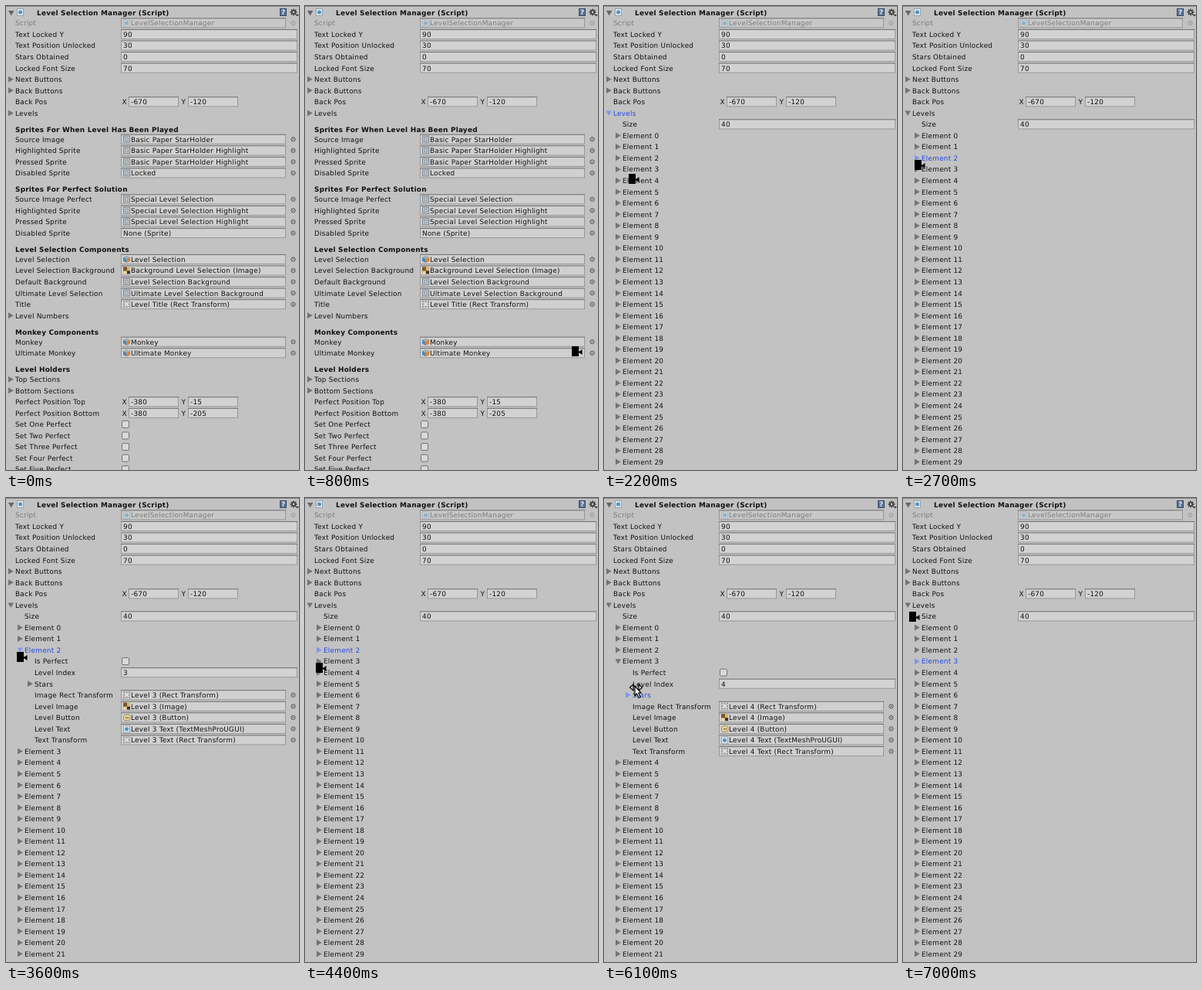
An HTML page with a canvas for the animation above (7.1 s loop, 380 px wide and 600 px high).

```html
<!DOCTYPE html>
<html>
<head>
<meta charset="utf-8">
<style>
html, body { margin: 0; width: 100%; height: 100%; overflow: hidden; background: #c2c2c2; }
canvas { display: block; }
</style>
</head>
<body>
<canvas id="stage" width="380" height="600"></canvas>
<script>
const ctx = document.getElementById('stage').getContext('2d');
ctx.textRendering = 'geometricPrecision';
ctx.letterSpacing = '0.24px';

const LOOP = 7100, STEP = 100, PITCH = 14.55, GAP = 19.4;
const INK = '#101010', BLUE = '#2349e2', FADED = '#7c7c7c';
const LABEL_X = [12, 24, 37, 49];

// Time, then top left corner of the pointer
const POINTER = [
  [100, 372, 588], [800, 346, 440], [1600, 6, 138], [1800, 6, 138], [2200, 32, 217],
  [2500, 14, 199], [2900, 15, 199], [3000, 15, 199], [3100, 33, 199], [3200, 24, 199],
  [3300, 24, 199], [3400, 24, 215], [3600, 14, 199], [3800, 14, 199], [4400, 14, 213],
  [4600, 14, 213], [5000, 37, 256], [5200, 27, 256], [6000, 27, 256], [6100, 33, 240],
  [6600, 14, 213], [6800, 14, 213], [7000, 8, 147]
];
// The foldout that has the focus from each time on
const FOCUS = [[1800, 'Levels'], [2700, 'Element 2'], [4500, 'Element 3'], [5300, 'Stars'], [6700, 'Element 3']];

let y, focus;

function rect(x, top, w, h, color) {
  ctx.fillStyle = color;
  ctx.fillRect(x, top, w, h);
}

function poly(points, fill, stroke) {
  ctx.beginPath();
  for (let i = 0; i < points.length; i += 2) ctx.lineTo(points[i], points[i + 1]);
  ctx.closePath();
  ctx.fillStyle = fill;
  ctx.fill();
  if (stroke) { ctx.strokeStyle = stroke; ctx.lineWidth = 1.2; ctx.stroke(); }
}

function disc(x, cy, r, fill) {
  ctx.beginPath();
  ctx.arc(x, cy, r, 0, 7);
  ctx.fillStyle = fill;
  ctx.fill();
}

function text(s, x, cy, color = INK, bold = false) {
  ctx.font = (bold ? 'bold ' : '') + '8.9px "DejaVu Sans", sans-serif';
  ctx.fillStyle = color;
  ctx.fillText(s, x, cy + 3.3);
}

const icons = {
  sprite(x, t) {
    rect(x, t, 9, 9, '#78828a');
    rect(x + 1, t + 1, 7, 7, '#cdd2d6');
    rect(x + 2, t + 2, 5, 5, '#8d9aa4');
    rect(x + 3, t + 3, 3, 3, '#bcc7ce');
  },
  prefab(x, t) {
    poly([x + 4.5, t, x + 9, t + 2, x + 4.5, t + 4.5, x, t + 2], '#9fb0b4');
    poly([x, t + 2, x + 4.5, t + 4.5, x + 4.5, t + 9.5, x, t + 7], '#4a88ba');
    poly([x + 9, t + 2, x + 4.5, t + 4.5, x + 4.5, t + 9.5, x + 9, t + 7], '#d9822f');
  },
  image(x, t) {
    rect(x, t, 9, 9, '#d8b67a');
    rect(x, t, 5, 5, '#80552b');
    rect(x + 5, t + 5, 4, 4, '#3f3226');
    rect(x + 1, t + 6, 3, 3, '#efdcae');
  },
  transform(x, t) {
    for (let i = 0; i < 9; i++) {
      if (i !== 4) rect(x + i % 3 * 3.5, t + Math.floor(i / 3) * 3.5, 2, 2, '#989898');
    }
    rect(x + 3, t + 3, 3, 3, '#e0e0e0');
  },
  button(x, t) {
    ctx.beginPath();
    ctx.roundRect(x + .5, t + 1, 8.5, 7.5, 2.5);
    ctx.fillStyle = '#e6d8a6';
    ctx.fill();
    ctx.strokeStyle = '#a88f51';
    ctx.lineWidth = 1;
    ctx.stroke();
    rect(x + 3, t + 4, 1.5, 2, '#776337');
    rect(x + 5.5, t + 4, 1.5, 2, '#776337');
  },
  script(x, t) {
    rect(x, t, 9, 10, '#98a3ab');
    rect(x + 1, t + 1, 7, 8, '#dfe7eb');
    disc(x + 4.5, t + 5, 2.5, '#4c96c6');
  }
};

function box(x, w, fill = '#d2d2d2') {
  const top = y - 6.5;
  rect(x, top, w, 13, '#989898');
  rect(x, top, w, 1, '#707070');
  rect(x + 1, top + 1, w - 2, 11, fill);
}

function row(name, depth = 0, color = INK) {
  text(name, LABEL_X[depth], y, color);
}

function next() { y += PITCH; }

function value(name, content, depth) {
  row(name, depth);
  box(149, 229);
  text(content, 152, y);
  next();
}

function object(name, content, icon, depth, disabled) {
  const color = disabled ? FADED : INK;
  row(name, depth, color);
  box(149, 214, disabled ? '#c8c8c8' : '#d0d0d0');
  if (icon) {
    if (disabled) ctx.globalAlpha = .5;
    icons[icon](152, y - 4.7);
    ctx.globalAlpha = 1;
  }
  text(content, icon ? 162 : 152, y, color);
  ctx.beginPath();
  ctx.arc(372.5, y, 2.6, 0, 7);
  ctx.strokeStyle = disabled ? '#9a9a9a' : '#4d4d4d';
  ctx.lineWidth = 1;
  ctx.stroke();
  disc(372.5, y, .8, ctx.strokeStyle);
  next();
}

function vector(name, a, b) {
  row(name);
  [['X', a, 159], ['Y', b, 236]].forEach(([axis, v, x]) => {
    text(axis, x - 8.5, y);
    box(x, 65);
    text(v, x + 3, y);
  });
  next();
}

function check(name, depth) {
  row(name, depth);
  ctx.beginPath();
  ctx.roundRect(150.5, y - 4.5, 9, 9, 1.5);
  ctx.fillStyle = '#d9d9d9';
  ctx.fill();
  ctx.strokeStyle = '#737373';
  ctx.lineWidth = 1;
  ctx.stroke();
  next();
}

function arrow(x, cy, open, color) {
  poly(open ? [x - .5, cy - 3, x + 7, cy - 3, x + 3.2, cy + 3.5]
            : [x, cy - 4, x + 6.8, cy, x, cy + 4], color);
}

function foldout(name, open, depth = 0, canFocus = true) {
  const active = canFocus && name === focus;
  arrow(LABEL_X[depth] - 9, y, open, active ? '#8298e8' : '#747474');
  row(name, depth, active ? BLUE : INK);
  next();
}

function heading(name) {
  y += GAP;
  text(name, 12, y - 13, INK, true);
}

function titleBar() {
  rect(0, 0, 380, 1, '#858585');
  arrow(3.5, 9, true, '#666');
  icons.script(14, 3);
  text('Level Selection Manager (Script)', 40, 8.7, INK, true);
  rect(355, 3, 9, 10, '#3a4a62');
  rect(356, 4, 7, 8, '#5a7599');
  text('?', 357, 8, '#e8edf2', true);
  disc(373, 8, 3, '#3a3a3a');
  for (let i = 0; i < 8; i++) {
    const a = i * Math.PI / 4;
    disc(373 + 3.6 * Math.cos(a), 8 + 3.6 * Math.sin(a), .9, '#3a3a3a');
  }
  disc(373, 8, 1.4, '#c2c2c2');
  poly([375.5, 11, 380, 11, 377.7, 13.5], '#3a3a3a');
}

function lowerSections() {
  heading('Sprites For When Level Has Been Played');
  object('Source Image', 'Basic Paper StarHolder', 'sprite');
  object('Highlighted Sprite', 'Basic Paper StarHolder Highlight', 'sprite');
  object('Pressed Sprite', 'Basic Paper StarHolder Highlight', 'sprite');
  object('Disabled Sprite', 'Locked', 'sprite');
  heading('Sprites For Perfect Solution');
  object('Source Image Perfect', 'Special Level Selection', 'sprite');
  object('Highlighted Sprite', 'Special Level Selection Highlight', 'sprite');
  object('Pressed Sprite', 'Special Level Selection Highlight', 'sprite');
  object('Disabled Sprite', 'None (Sprite)');
  heading('Level Selection Components');
  object('Level Selection', 'Level Selection', 'prefab');
  object('Level Selection Background', 'Background Level Selection (Image)', 'image');
  object('Default Background', 'Level Selection Background', 'sprite');
  object('Ultimate Level Selection', 'Ultimate Level Selection Background', 'sprite');
  object('Title', 'Level Title (Rect Transform)', 'transform');
  foldout('Level Numbers');
  heading('Monkey Components');
  object('Monkey', 'Monkey', 'prefab');
  object('Ultimate Monkey', 'Ultimate Monkey', 'prefab');
  heading('Level Holders');
  foldout('Top Sections');
  foldout('Bottom Sections');
  vector('Perfect Position Top', '-380', '-15');
  vector('Perfect Position Bottom', '-380', '-205');
  for (const n of ['One', 'Two', 'Three', 'Four', 'Five']) check(`Set ${n} Perfect`);
}

function levelDetails(n, starsOpen) {
  check('Is Perfect', 2);
  value('Level Index', n, 2);
  foldout('Stars', starsOpen, 2);
  if (starsOpen) {
    value('Size', 3, 3);
    for (let i = 0; i < 3; i++) object('Element ' + i, `Star ${i + 1} (Image)`, 'image', 3);
  }
  object('Image Rect Transform', `Level ${n} (Rect Transform)`, 'transform', 2);
  object('Level Image', `Level ${n} (Image)`, 'image', 2);
  object('Level Button', `Level ${n} (Button)`, 'button', 2);
  object('Level Text', `Level ${n} Text (TextMeshProUGUI)`, 'script', 2);
  object('Text Transform', `Level ${n} Text (Rect Transform)`, 'transform', 2);
}

function levelList(t) {
  const opened = t >= 2800 && t < 3800 ? 2 : t >= 4600 && t < 6800 ? 3 : -1;
  value('Size', 40, 1);
  for (let i = 0; y < 594; i++) {
    foldout('Element ' + i, i === opened, 1);
    if (i === opened) levelDetails(i + 1, t >= 5400 && t < 6000);
  }
}

function pointer(t) {
  const i = POINTER.findLastIndex(k => k[0] <= t);
  if (i < 0) return;
  const a = POINTER[i], b = POINTER[i + 1] || a;
  const p = b === a ? 0 : (t - a[0]) / (b[0] - a[0]);
  ctx.save();
  ctx.translate(Math.round(a[1] + (b[1] - a[1]) * p), Math.round(a[2] + (b[2] - a[2]) * p));
  if (t === 6100) {
    poly([.5, 5, 5, 1, 5, 9], '#ddd', '#000');
    poly([16.5, 5, 12, 1, 12, 9], '#ddd', '#000');
    poly([7, 3, 7, 15.5, 9.5, 13, 12, 18.5, 14, 17.5, 11.7, 12, 15, 12], '#fff', '#000');
  } else {
    rect(0, 0, 9, 13, '#000');
    poly([9, 6.5, 10, 6.5, 13.5, 4, 13.5, 11, 10, 8.5, 9, 8.5], '#000');
  }
  ctx.restore();
}

function draw(t) {
  focus = (FOCUS.findLast(f => f[0] <= t) || [])[1];
  rect(0, 0, 380, 600, '#c2c2c2');
  titleBar();
  y = 22;
  object('Script', 'LevelSelectionManager', 'script', 0, true);
  value('Text Locked Y', 90);
  value('Text Position Unlocked', 30);
  value('Stars Obtained', 0);
  value('Locked Font Size', 70);
  foldout('Next Buttons');
  foldout('Back Buttons');
  vector('Back Pos', '-670', '-120');
  const open = t >= 1900;
  foldout('Levels', open);
  open ? levelList(t) : lowerSections();
  pointer(t);
}

function tick() {
  draw(Math.floor(performance.now() % LOOP / STEP) * STEP);
  requestAnimationFrame(tick);
}
tick();
</script>
</body>
</html>
```
